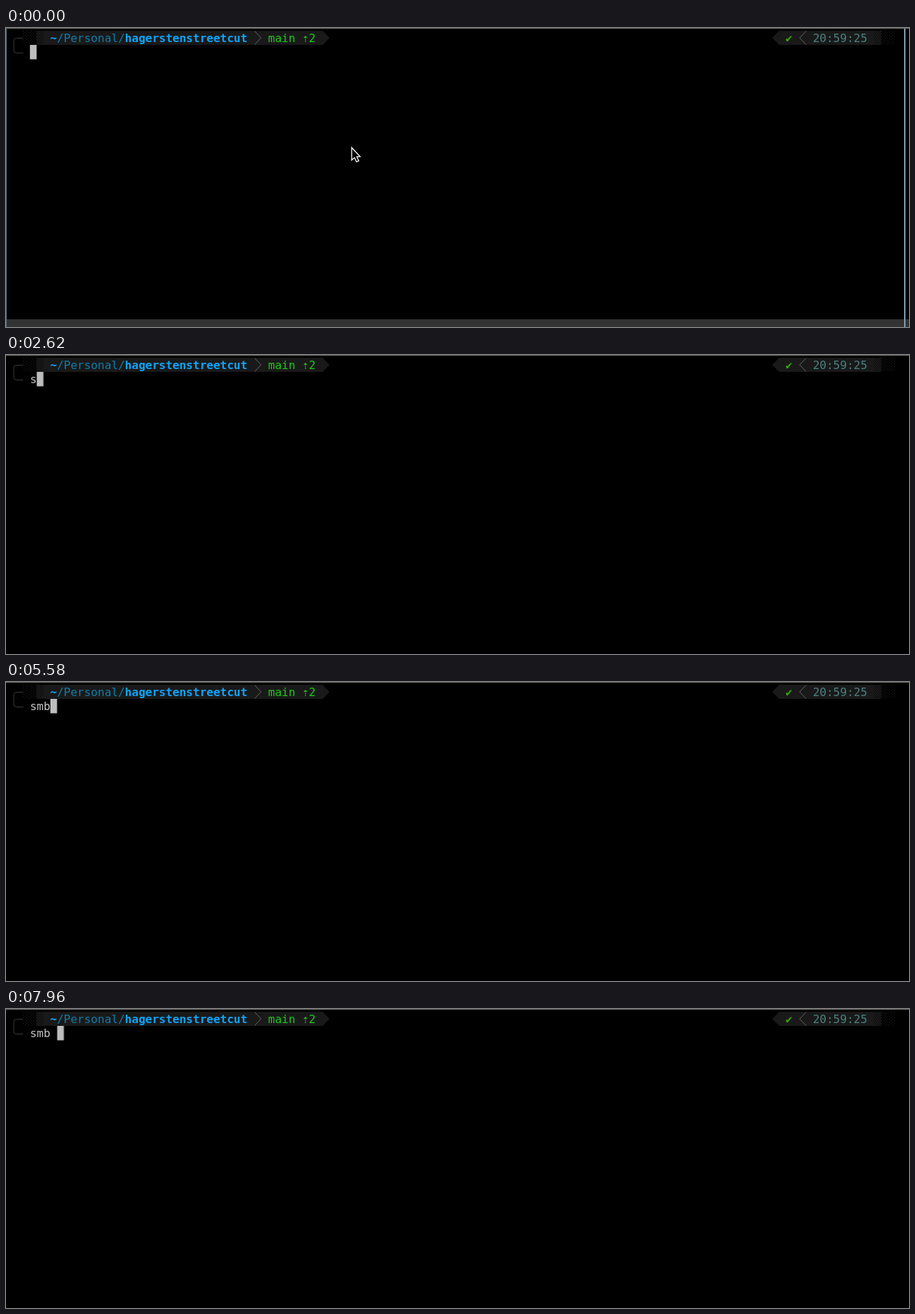
These frames come from a looping animation (1280 px wide and 425 px high, 8000 ms). An HTML page:

```html
<!DOCTYPE html>
<html lang="en">
<head>
<meta charset="utf-8">
<title>Terminal prompt</title>
<style>
  html, body { margin: 0; width: 100%; height: 100%; overflow: hidden; background: #000; }
  svg { display: block; width: 1280px; height: 425px; }
  text { font: 16.03px "DejaVu Sans Mono", monospace; white-space: pre; }
  .bold { font-weight: bold; fill: #0fa4fa; }
  .path { fill: #137ba9; }
  .branch { fill: #1ccb1c; }
  .ok { fill: #38a60a; }
  .clock { fill: #4c8080; }
  .typed { fill: #c4c4c4; }
  .line { fill: none; stroke: #393939; }
  .chevron { fill: none; stroke: #656565; }

  .window, .key, .cursor { animation: 8s step-end infinite; }
  .window { animation-name: leave; }
  .s { animation-name: key-s; }
  .m { animation-name: key-m; }
  .b { animation-name: key-b; }
  .cursor { fill: #bdbdbd; animation-name: advance; }

  @keyframes leave { 0% { opacity: 1; } 32.5%, 100% { opacity: 0; } }
  @keyframes key-s { 0% { opacity: 0; } 32.5%, 100% { opacity: 1; } }
  @keyframes key-m { 0% { opacity: 0; } 35%, 100% { opacity: 1; } }
  @keyframes key-b { 0% { opacity: 0; } 65.75%, 100% { opacity: 1; } }
  @keyframes advance {
    0% { transform: none; }
    32.5% { transform: translateX(9.65px); }
    35% { transform: translateX(19.3px); }
    65.75% { transform: translateX(28.95px); }
    79.75%, 100% { transform: translateX(38.6px); }
  }
</style>
</head>
<body>
<svg viewBox="0 0 1280 425">
  <defs>
    <pattern id="light" width="5" height="4" patternUnits="userSpaceOnUse">
      <path d="M0 0h1v1h-1zM2.5 2h1v1h-1z" fill="#222"/>
    </pattern>
    <pattern id="medium" width="3" height="4" patternUnits="userSpaceOnUse">
      <path d="M0 0h1v1h-1zM1.5 2h1v1h-1z" fill="#222"/>
    </pattern>
    <pattern id="dark" width="3" height="4" patternUnits="userSpaceOnUse">
      <path d="M0 0h3v4h-3z" fill="#191919"/>
      <path d="M0 0h1v1h-1zM1.5 2h1v1h-1z" fill="#000"/>
    </pattern>
    <g id="fade">
      <path d="M0 4h9.65v20h-9.65z" fill="url(#light)"/>
      <path d="M9.65 4h9.65v20h-9.65z" fill="url(#medium)"/>
      <path d="M19.3 4h9.65v20h-9.65z" fill="url(#dark)"/>
    </g>
  </defs>

  <rect width="1280" height="425"/>
  <rect width="1280" height="1" fill="#6c6c65"/>

  <!-- prompt segments -->
  <g fill="#191919">
    <path d="M52.5 4H449L458.5 14L449 24H52.5Z"/>
    <path d="M1231 4H1096L1086 14L1096 24H1231Z"/>
  </g>
  <use href="#fade" x="24"/>
  <use href="#fade" transform="matrix(-1 0 0 1 1260 0)"/>
  <path class="line" d="M24.5 14.5H14.5Q11 14.5 11 18V32Q11 35.5 14.5 35.5H24.5"/>
  <path class="chevron" d="M352.5 4.5L361.5 14L352.5 23.5M1134 4.5L1125 14L1134 23.5"/>

  <text x="62.5" y="20"><tspan class="bold">~</tspan><tspan class="path">/Personal/</tspan><tspan class="bold">hagerstenstreetcut</tspan></text>
  <text class="branch" x="371.5" y="20">main ⇡2</text>
  <text class="ok" x="1105" y="20">✔</text>
  <text class="clock" x="1143.7" y="20">20:59:25</text>

  <!-- command line -->
  <g class="typed">
    <text class="key s" x="33.9" y="40">s</text>
    <text class="key m" x="43.55" y="40">m</text>
    <text class="key b" x="53.2" y="40">b</text>
  </g>
  <rect class="cursor" x="33.9" y="24" width="9.5" height="20.5"/>

  <!-- window edges and pointer -->
  <g class="window">
    <rect y="414" width="1280" height="11" fill="#333"/>
    <rect y="1" width="1" height="424" fill="#587080"/>
    <rect x="1273" y="1" width="2" height="424" fill="#7d9db5"/>
    <path d="M490 170V187.8L494 184.2L496.8 190.2L500 188.8L497.2 182.8H502Z" fill="#000" stroke="#fff" stroke-width="1.3"/>
  </g>
</svg>
</body>
</html>
```
